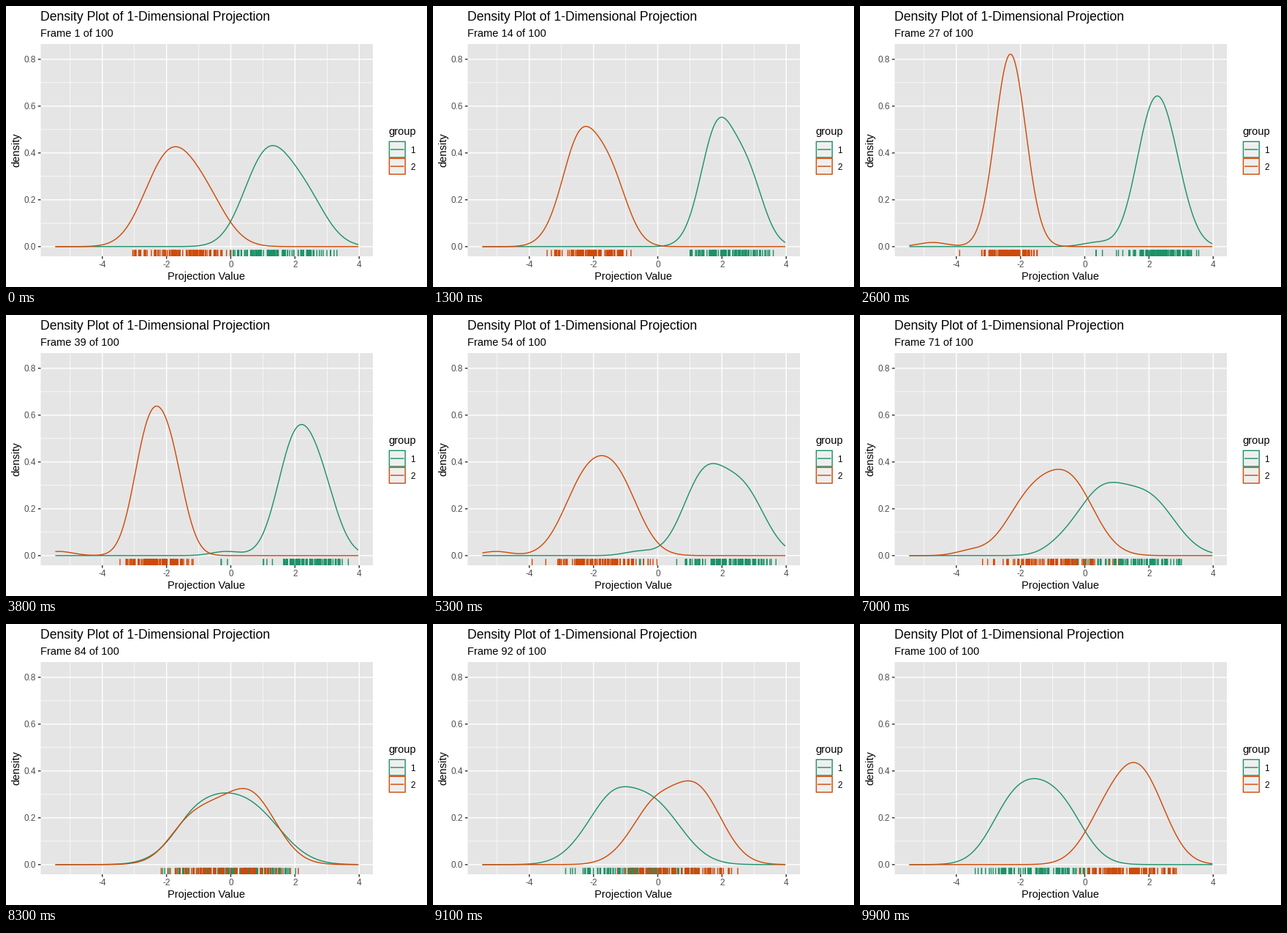
Write a matplotlib script that moves like this. It is 576 px wide and 384 px high and loops after 10 s.

```python
import numpy as np
import matplotlib.pyplot as plt
from matplotlib.animation import FuncAnimation
from matplotlib.patches import Rectangle

W, H, DPI = 576, 384, 96
COUNT = 100
N_RUG = 100
PX = 72 / DPI  # one pixel in points
LINE = 1.42 * PX
GREEN, ORANGE = "#1D9167", "#CE4A08"
LEFT, TOP, RIGHT, BOTTOM = 47.5, 52, 502, 342

plt.rcParams["font.family"] = ["Liberation Sans", "DejaVu Sans"]
plt.rcParams["path.snap"] = False

# Key poses of the turning projection: where each group's two clouds lie.
TIMES = np.array([1, 14, 27, 39, 54, 71, 84, 100], float)
GREEN_PATH = dict(
    low=[1.05, 1.85, 2.05, 1.95, 1.45, .5, -.75, -2.15],
    high=[2.25, 2.78, 2.65, 2.75, 2.7, 2.05, .75, -.8],
    spread=[.68, .5, .52, .54, .66, .8, .92, .74],
)
ORANGE_PATH = dict(
    low=[-2.05, -2.45, -2.4, -2.6, -2.3, -1.7, -.95, .75],
    high=[-.9, -1.5, -2.2, -1.9, -1.25, -.42, .62, 1.85],
    spread=[.71, .54, .465, .46, .68, .75, .8, .71],
)
STRAY = .02  # share of outlying points

GRID = np.linspace(-8, 7, 3000)
XS = np.linspace(-5.448, 3.958, 512)


def px(x):
    return 307.5 + 43.93 * np.asarray(x)


def py(d):
    return 328.8 - 320 * np.asarray(d)


def ease(values, t):
    """Smooth cubic path through the key poses."""
    slope = np.gradient(values, TIMES)
    k = min(np.searchsorted(TIMES, t, side="right") - 1, len(TIMES) - 2)
    h = TIMES[k + 1] - TIMES[k]
    s = (t - TIMES[k]) / h
    return ((1 + 2 * s) * (1 - s) ** 2 * values[k]
            + s * (1 - s) ** 2 * h * slope[k]
            + s * s * (3 - 2 * s) * values[k + 1]
            + s * s * (s - 1) * h * slope[k + 1])


def bell(x, mid, spread):
    return np.exp(-.5 * ((x - mid) / spread) ** 2) / (spread * np.sqrt(2 * np.pi))


class Group:
    def __init__(self, path, share, reach, color, seed):
        self.path, self.share, self.reach = path, share, reach
        self.z = np.random.default_rng(seed).normal(size=(2, N_RUG))
        self.curve, = ax.plot([], [], color=color, lw=LINE, zorder=4)
        self.rug, = ax.plot([], [], color=color, lw=LINE, zorder=5,
                            solid_capstyle="butt")

    def update(self, t):
        angle = np.pi * (t - 1) / (COUNT - 1)
        low, high, spread = (ease(self.path[k], t) for k in ("low", "high", "spread"))
        first, last = self.share
        share = (first + last) / 2 + (first - last) / 2 * np.cos(angle)
        mean = share * low + (1 - share) * high
        stray = mean - self.reach * np.sin(angle)

        def density(x):
            clouds = share * bell(x, low, spread) + (1 - share) * bell(x, high, spread)
            return (1 - STRAY) * clouds + STRAY * bell(x, stray, .45)

        self.curve.set_data(px(XS), py(density(XS)))

        # Points turn in a plane and are spread out to follow the curve.
        z = self.z[0] * np.cos(angle) + self.z[1] * np.sin(angle)
        cdf = np.cumsum(density(GRID))
        x = np.interp(1 / (1 + np.exp(-1.702 * z)), cdf / cdf[-1], GRID)
        x = np.clip(mean + .94 * (x - mean), XS[0], XS[-1])
        self.rug.set_data(np.repeat(px(x), 3),
                          np.tile([BOTTOM, BOTTOM - 8.7, np.nan], N_RUG))


def segment(x, y, color, width, z=1):
    ax.plot(x, y, color=color, lw=width * PX, zorder=z, solid_capstyle="butt")


def label(x, y, s, size=11, color="black", **kw):
    return ax.text(x, y, s, fontsize=size, color=color, **kw)


fig = plt.figure(figsize=(W / DPI, H / DPI), dpi=DPI, facecolor="white")
ax = fig.add_axes([0, 0, 1, 1])
ax.set(xlim=(0, W), ylim=(H, 0))
ax.axis("off")

ax.add_patch(Rectangle((LEFT, TOP), RIGHT - LEFT, BOTTOM - TOP,
                       fc="#E5E5E5", ec="none", zorder=0))
for v in range(-5, 5):
    major = v % 2 == 0
    segment([px(v)] * 2, [TOP, BOTTOM], "white", 1.42 if major else .71)
    if major:
        segment([px(v)] * 2, [BOTTOM, BOTTOM + 3.67], "#333333", 1.42)
        label(px(v), 357, str(v), 8.8, "#4D4D4D", ha="center")
for i in range(9):
    y = py(i / 10)
    major = i % 2 == 0
    segment([LEFT, RIGHT], [y, y], "white", 1.42 if major else .71)
    if major:
        segment([LEFT - 3.67, LEFT], [y, y], "#333333", 1.42)
        label(41, y + 4.6, f"{i / 10:.1f}", 8.8, "#4D4D4D", ha="right")

label(47, 20, "Density Plot of 1-Dimensional Projection", 13.2)
counter = label(47, 42, "")
label(273.8, 374, "Projection Value", ha="center")
label(21.5, 196.5, "density", rotation=90, ha="right", va="center")

label(523.5, 176, "group")
for name, color, y in (("1", GREEN, 184.7), ("2", ORANGE, 207.7)):
    ax.add_patch(Rectangle((524.4, y + .6), 21.8, 21.6, fc="#EFEFEF", ec=color,
                           lw=LINE, zorder=2))
    segment([526, 544.5], [y + 11.4] * 2, color, 1.42, 3)
    label(553.3, y + 16, name, 8.8)

groups = [Group(GREEN_PATH, (.62, .52), 2.6, GREEN, 4),
          Group(ORANGE_PATH, (.6, .4), 3.3, ORANGE, 11)]


def draw(i):
    counter.set_text(f"Frame {i + 1} of {COUNT}")
    for g in groups:
        g.update(i + 1)


anim = FuncAnimation(fig, draw, frames=COUNT, interval=100, repeat=True,
                     repeat_delay=0, init_func=lambda: draw(0))
plt.show()
```
